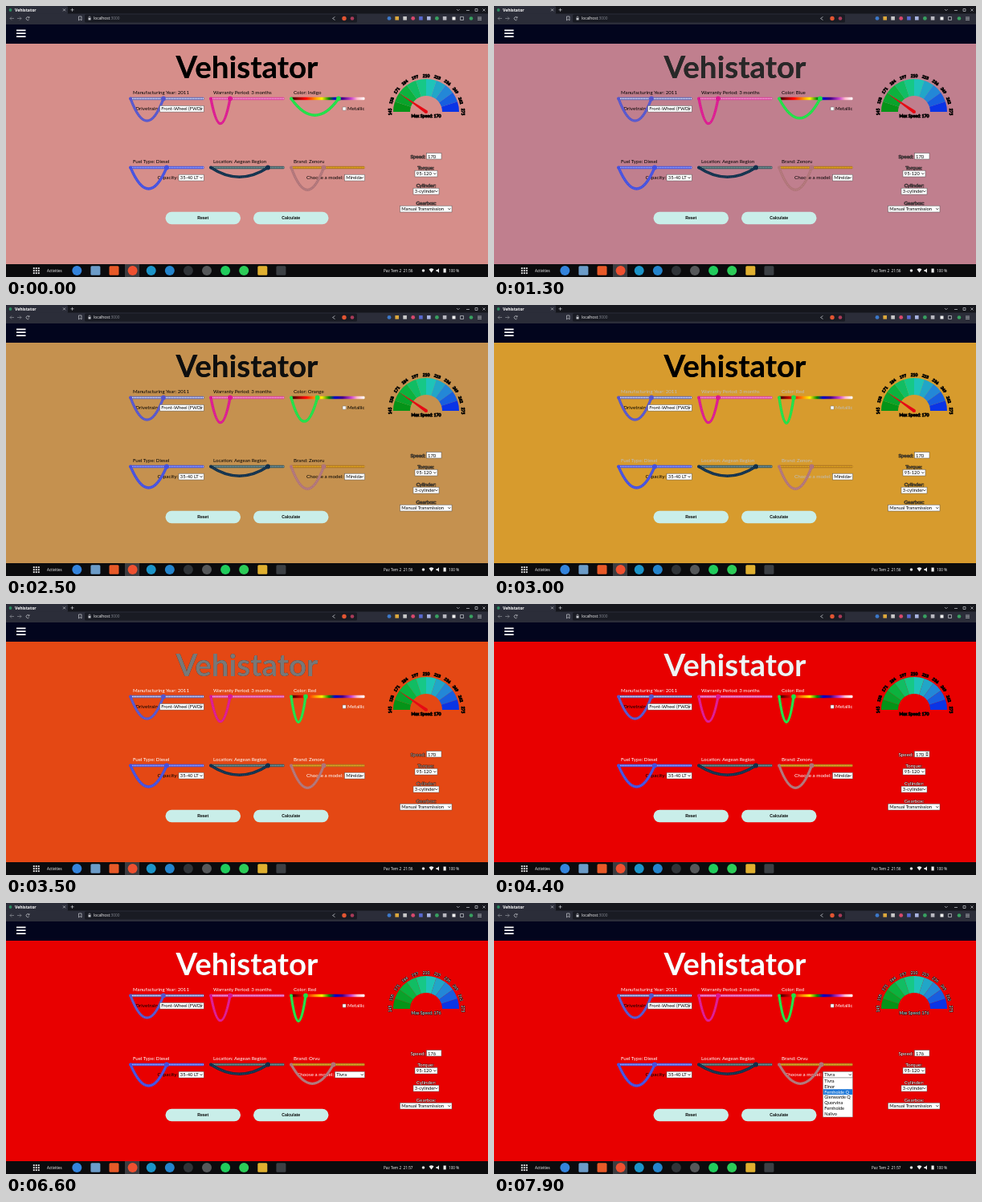
Recreate the animation shown at these times as an HTML page. Size 600 px wide and 338 px high, loop 8000 ms.

```html
<!DOCTYPE html>
<html lang="en">
<head>
<meta charset="utf-8">
<title>Vehistator</title>
<style>
html, body { margin: 0; height: 100%; overflow: hidden; background: #000; }
svg { display: block; width: 100vw; height: 100vh; }
text { font-family: Lato, sans-serif; white-space: pre; }
.ui { font-family: "Noto Sans", sans-serif; }
.btn { font-family: "Liberation Sans", sans-serif; }
.edge { paint-order: stroke; stroke: #000; stroke-width: .9px; stroke-linejoin: round; }
.title { filter: drop-shadow(.6px .6px .5px rgba(0, 0, 0, .7)); }
</style>
</head>
<body>
<svg viewBox="0 0 600 338" preserveAspectRatio="none">
  <defs>
    <linearGradient id="rainbow">
      <stop offset="0" stop-color="#200"/><stop offset=".1" stop-color="#900"/>
      <stop offset=".2" stop-color="#f00"/><stop offset=".32" stop-color="#f80"/>
      <stop offset=".42" stop-color="#fe0"/><stop offset=".52" stop-color="#080"/>
      <stop offset=".6" stop-color="#00c"/><stop offset=".7" stop-color="#408"/>
      <stop offset=".82" stop-color="#c4c"/><stop offset=".9" stop-color="#fbc"/>
      <stop offset="1" stop-color="#fff"/>
    </linearGradient>
  </defs>
  <g id="page"></g>
  <g id="chrome"></g>
</svg>
<script>
const LOOP = 8000, APP = 'Vehistator';
const page = document.getElementById('page');

const text = (x, y, s, size = 6.15, fill = '#000', anchor = 'start', extra = '') =>
  `<text x="${x}" y="${y}" font-size="${size}" fill="${fill}" text-anchor="${anchor}" ${extra}>${s}</text>`;
const rect = (x, y, w, h, fill, extra = '') =>
  `<rect x="${x}" y="${y}" width="${w}" height="${h}" fill="${fill}" ${extra}/>`;
const dot = (x, y, r, fill, extra = '') =>
  `<circle cx="${x}" cy="${y}" r="${r}" fill="${fill}" ${extra}/>`;
const line = (d, color, width = .7, extra = '') =>
  `<path d="${d}" fill="none" stroke="${color}" stroke-width="${width}" ${extra}/>`;

// Linear interpolation through rows of [time, ...values]
function track(t, rows) {
  if (t <= rows[0][0]) return rows[0].slice(1);
  const i = rows.findIndex(r => r[0] > t);
  if (i < 0) return rows.at(-1).slice(1);
  const a = rows[i - 1], b = rows[i], k = (t - a[0]) / (b[0] - a[0]);
  return a.slice(1).map((v, j) => v + (b[j + 1] - v) * k);
}
const rgb = c => `rgb(${c.map(Math.round)})`;
const grey = v => rgb([v, v, v]);

function chrome() {
  const ui = 'class="ui"', pale = '#c8cad0';
  let s = rect(0, 0, 600, 10, '#15161c') + rect(0, 0, 77, 10, '#2b2d39', 'rx="1.5"') +
    rect(0, 9.5, 600, 13.5, '#2b2d39') + rect(98, 10.5, 339, 10, '#191b23', 'rx="1.5"') +
    dot(5.5, 5, 1.9, '#2a8a60') + text(11, 6.8, APP, 5.1, '#fff', 'start', ui + ' font-weight="600"') +
    line('M71 3.4l3 3m0-3l-3 3M82.5 2.8v4m-2-2h4M561 4l1.8 1.8L564.600 4M573 5.500h4M584 3.500h3v3h-3zM593.500 3.500l3 3m0-3l-3 3', pale) +
    line('M10 15.500H5m2-2l-2 2 2 2M14 15.500h5m-2-2l2 2-2 2', '#8d9099') +
    line('M28.800 14.500a2 2 0 1 0 0 2.200m.2-3.500v1.600h-1.600M90.500 13h3.500v5l-1.750-1.500-1.750 1.500z', pale) +
    rect(102.5, 15, 3, 2.5, pale) + line('M103 15v-1a1 1 0 0 1 2 0v1', pale, .6) +
    text(109, 17.3, 'localhost<tspan fill="#7d808a">:3000</tspan>', 4.8, '#eee', 'start', ui) +
    line('M409.500 13.500l-3 2 3 2', pale) + dot(421, 15.5, 2.7, '#e25532') + dot(431, 15.5, 2.3, '#a83a58');
  ['#3c78c8', '#dca83c', '#c8c8c8', '#d8486c', '#5868d0', '#a8b4e0', '#38a060', '#b8b8c0']
    .forEach((c, i) => s += i % 3 ? rect(474.5 + i * 9.9, 13, 4.6, 4.6, c) : dot(477 + i * 9.9, 15.4, 2.4, c));
  s += rect(555.5, 13.5, 4, 4, '#eee') + line('M565.500 13.500h4v4h-4z', pale) +
    dot(579, 15.5, 2.3, '#38a060') + line('M587 14h5m-5 1.700h5m-5 1.700h5', pale) +
    rect(0, 23, 600, 24.5, '#02051d') +
    line('M13 30.300h11.500M13 34.200h11.500M13 38.100h11.500', '#fff', 1.7) +
    rect(0, 322, 600, 16, '#0b0b0d');
  for (let i = 0; i < 9; i++) s += rect(33.8 + i % 3 * 3, 326.2 + (i / 3 | 0) * 3, 1.9, 1.9, '#eee');
  s += text(51, 331.8, 'Activities', 4.5, '#eee', 'start', ui) + rect(148, 322, 18, 16, '#3c3c40');
  ['#3484dc', '#6c9cc8', '#e85a28', '#ee5030', '#1c94c8', '#2484cc', '#303438', '#56585a',
   '#20cc5c', '#2ccc58', '#e0b030', '#3c4044'].forEach((c, i) => {
    const x = 88.3 + i * 23.1;
    s += [1, 2, 10, 11].includes(i) ? rect(x - 6, 324.3, 12, 11.5, c, 'rx="1.5"') : dot(x, 330, 6, c);
  });
  s += dot(519.5, 330, 1.8, '#ddd') + `<path d="M526.500 328.500q3-2.500 6 0l-3 4z" fill="#eee"/>` +
    `<path d="M535.500 329h1.500l2-1.800v5.600l-2-1.800h-1.500z" fill="#eee"/>` +
    rect(544.5, 327.5, 3.2, 5, '#eee') + text(551, 331.8, '100 %', 4.7, '#eee', 'start', ui);
  return s;
}

function slider(x, y, pos, rope, bar, stripe) {
  const w = pos - x, sag = Math.sqrt(.75 * Math.max(0, 1444 - w * w / 4));
  const d = `M${x} ${y}Q${x + w / 2} ${y + 2 * sag} ${pos} ${y}`;
  return rect(x - .5, y - 1.8, 92, 3.6, bar, 'rx="1.2"') +
    (stripe ? line(`M${x} ${y}h91`, stripe, 1.7, 'stroke-dasharray="1.3 .7"') : '') +
    line(d, rope, 3.3, 'stroke-linecap="round"') +
    line(d, '#fff', 1, 'stroke-dasharray=".7 1.6" opacity=".22"') +
    dot(x, y, 2, rope) + dot(pos, y, 2.9, rope);
}

function select(x, y, w, s) {
  const r = x + w - 4.6;
  return rect(x, y, w, 7.8, '#fff', 'stroke="#555" stroke-width=".5"') +
    text(x + 1.8, y + 5.9, s, 5.8) + line(`M${r} ${y + 3.2}l1.400 1.500 1.400-1.500`, '#111', .8);
}

function gauge(speed, t) {
  const cx = 523, cy = 132, ink = speed > 170 ? '#fff' : '#000';
  const at = (r, a) => `${cx - r * Math.cos(a)} ${cy - r * Math.sin(a)}`;
  let s = '';
  for (let i = 0; i < 10; i++) {
    const a = i * Math.PI / 10, b = a + Math.PI / 10;
    const c = track(i, [[0, 5, 148, 24], [2, 12, 178, 62], [4, 22, 200, 135],
                        [5, 30, 196, 185], [7, 35, 135, 215], [9, 10, 52, 230]]);
    s += `<path d="M${at(41, a)}A41 41 0 0 1 ${at(41, b)}L${at(20, b)}A20 20 0 0 0 ${at(20, a)}z" fill="${rgb(c)}"/>`;
  }
  for (let i = 0; i <= 10; i++)
    s += text(cx, cy - 43.5, 145 + 13 * i, 4.9, ink, 'middle',
      `class="edge" transform="rotate(${i * 18 - 90} ${cx} ${cy})"`);
  if (t < 4000) {
    const a = (speed - 145) / 130 * Math.PI;
    s += `<path d="M${at(40, a)}L${at(2, a + 1.57)}L${at(2, a - 1.57)}z" fill="#e60a14"/>` + dot(cx, cy, 2, '#e60a14');
  }
  return s + text(cx, 139, 'Max Speed: ' + speed, 5.2, ink, 'middle', 'class="edge"');
}

function sidebar(speed, t, ink) {
  const label = (x, y, s) => text(x, y, s, 6.3, ink, 'middle', 'class="edge" stroke-opacity=".6"');
  return label(512.8, 189.7, 'Speed:') + rect(523.5, 183.5, 18.5, 7.5, '#fff', 'stroke="#555" stroke-width=".5"') +
    text(525, 189.5, speed, 5.9) +
    (t > 4100 && t < 5900 ? rect(536.5, 184, 5, 6.5, '#ddd') +
      '<path d="M539 184.700l1.400 1.800h-2.800zM539 189.800l1.400-1.800h-2.800z" fill="#333"/>' : '') +
    label(522.5, 204, 'Torque:') + select(509, 205.2, 28, '95-120') +
    label(523, 226, 'Cylinder:') + select(507, 227.2, 32, '3-cylinder') +
    label(523, 248, 'Gearbox:') + select(490.5, 249.2, 64.5, 'Manual Transmission');
}

function menu(t) {
  const active = t < 7400 ? 0 : t < 7600 ? 1 : 2;
  let s = rect(409.5, 218, 37, 49, '#fff', 'stroke="#777" stroke-width=".5"');
  ['Tivra', 'Elnor', 'Fernholde Q', 'Glenwarde Q', 'Quorvina', 'Fernholde', 'Nalivo'].forEach((name, i) => {
    const y = 218.4 + i * 6.9;
    if (i === active) s += rect(409.8, y, 36.4, 6.9, '#1e78d8');
    s += text(411.3, y + 5.3, name, 5.6, i === active ? '#fff' : '#000');
  });
  return s;
}

function draw(t) {
  const bg = rgb(track(t, [[950, 214, 142, 138], [1900, 154, 101, 150], [2700, 211, 160, 55],
    [3000, 215, 155, 45], [3500, 228, 72, 20], [3950, 232, 0, 0]]));
  const titleInk = grey(track(t, [[950, 0], [1900, 108], [2600, 0], [3050, 0], [3500, 120], [4200, 238], [5000, 255]])[0]);
  const ink = grey(track(t, [[2850, 0], [3050, 250], [3300, 255]])[0]);
  const sideInk = grey(track(t, [[3000, 70], [4100, 255]])[0]);
  const [hue] = track(t, [[1000, 414], [1750, 394], [2350, 394], [2850, 373]]);
  const [brand] = track(t, [[6000, 395.5], [6500, 407.5]]);
  const [speed] = track(t, [[4500, 170], [5300, 176]]).map(Math.floor);
  const color = [[411, 'Indigo'], [404, 'Blue'], [397, 'Green'], [388, 'Yellow'], [378, 'Orange'], [0, 'Red']]
    .find(c => hue >= c[0])[1];
  const swapped = brand > 402, modelX = swapped ? 409.5 : 421.5;

  page.innerHTML = rect(0, 47, 600, 275, bg) +
    text(300, 90, APP, 38.5, titleInk, 'middle', 'class="title" font-weight="700"') +
    text(158, 109.7, 'Manufacturing Year: 2011', 6.15, ink) +
    text(258, 109.7, 'Warranty Period: 3 months', 6.15, ink) +
    text(358, 109.7, 'Color: ' + color, 6.15, ink) +
    text(158, 195.6, 'Fuel Type: Diesel', 6.15, ink) +
    text(258, 195.6, 'Location: Aegean Region', 6.15, ink) +
    text(358, 195.6, 'Brand: ' + (swapped ? 'Orvu' : 'Zenoru'), 6.15, ink) +
    text(190.5, 130.4, 'Drivetrain:', 6.3, '#000', 'end') +
    text(214, 216.2, 'Capacity:', 6.3, '#000', 'end') +
    text(modelX - 1.5, 216.2, 'Choose a model:', 6.3, ink, 'end') +
    text(425, 130.4, 'Metallic', 6.15, ink) +
    rect(419, 126, 4.2, 4.2, '#fff', 'stroke="#666" stroke-width=".5" rx=".6"') +
    slider(155, 115.5, 196, '#5555cc', '#5c62b0', '#f0f0ff') +
    slider(255, 115.5, 279, '#dc1890', '#d83c98', '#f4b4dc') +
    slider(355, 115.5, hue, '#1ee046', 'url(#rainbow)') +
    slider(155, 201.5, 200, '#4450e0', '#4450d8', '#a8b0fa') +
    slider(255, 201.5, 326, '#10304c', '#34545c', '#8ca4a4') +
    slider(355, 201.5, brand, '#b07478', '#a87020', '#f4b820') +
    select(191.5, 124.3, 54.7, 'Front-Wheel (FWD)') +
    select(215, 210.2, 31.2, '35-40 LT') +
    select(modelX, 210.2, 446.5 - modelX, swapped ? 'Tivra' : 'Mirelda') +
    [[198.5, 'Reset'], [308, 'Calculate']].map(([x, s]) =>
      rect(x, 256.8, 93.5, 15.4, '#c9eee9', 'rx="7.7"') +
      text(x + 46.7, 266.3, s, 5.1, '#000', 'middle', 'class="btn" font-weight="700"')).join('') +
    gauge(speed, t) + sidebar(speed, t, sideInk) +
    (t >= 7100 ? menu(t) : '') +
    text(470, 331.8, 'Paz Tem 2  ' + (t < 6500 ? '21:56' : '21:57'), 4.7, '#eee', 'start', 'class="ui"');
}

document.getElementById('chrome').innerHTML = chrome();
// The clock is drawn with the page, so the page sits above the fixed bars.
page.parentNode.append(page);

const start = performance.now();
function tick() {
  draw((performance.now() - start) % LOOP);
  requestAnimationFrame(tick);
}
tick();
</script>
</body>
</html>
```
